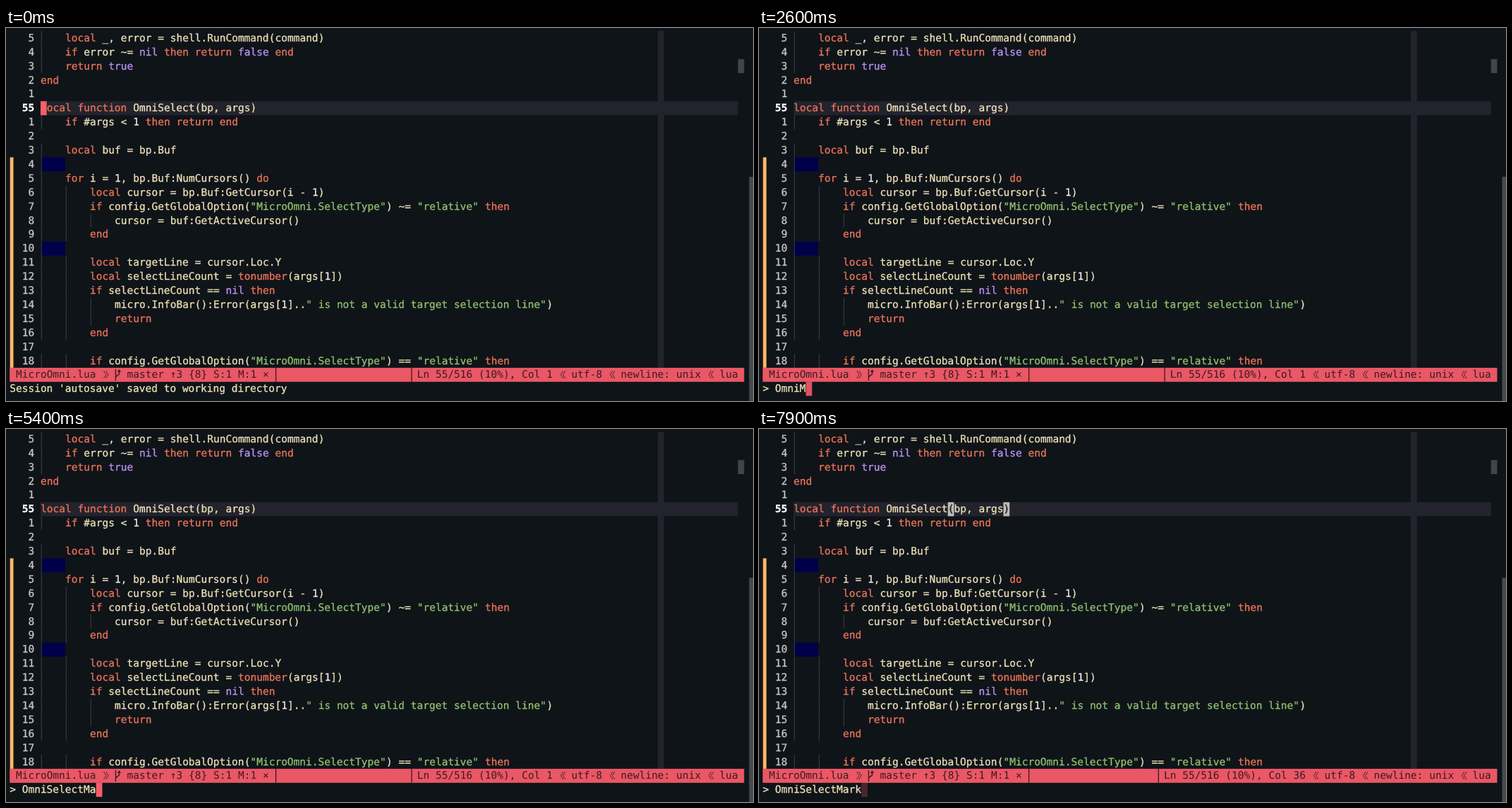
An HTML page that plays this animation: 1059 px wide and 529 px high, repeating every 8000 ms.

```html
<!DOCTYPE html>
<html lang="en">
<head>
<meta charset="utf-8">
<title>Terminal editor</title>
<style>
html, body { margin: 0; width: 100%; height: 100%; overflow: hidden; background: #0f1419; }
svg { display: block; width: 100vw; height: 100vh; }
text {
  font: 14.53px "DejaVu Sans Mono", monospace;
  text-rendering: geometricPrecision;
  white-space: pre;
}
</style>
</head>
<body>
<svg id="stage" viewBox="0 0 1059 529" xmlns="http://www.w3.org/2000/svg"></svg>
<script>
const CW = 8.75, RH = 19.9, LEFT = 5.2, TOP = 4.3, GUTTER = 5;
const LOOP = 8000, STEP = 100, BLINK = 800;
const C = {
  bg: '#0f1419', line: '#23232d', text: '#ede0b5', key: '#ec7358', lit: '#bb91ef',
  str: '#8fc06d', num: '#f4efe2', gutter: '#c5c8c6', guide: '#393c42', diff: '#feb766',
  trail: '#00004a', bar: '#ea5765', ink: '#3a1a22', cursor: '#fb5b6a', match: '#b9bab8', thumb: '#42444d'
};

const code = [
  '    local _, error = shell.RunCommand(command)',
  '    if error ~= nil then return false end',
  '    return true',
  'end',
  '',
  'local function OmniSelect(bp, args)',
  '    if #args < 1 then return end',
  '',
  '    local buf = bp.Buf',
  '    ',
  '    for i = 1, bp.Buf:NumCursors() do',
  '        local cursor = bp.Buf:GetCursor(i - 1)',
  '        if config.GetGlobalOption("MicroOmni.SelectType") ~= "relative" then',
  '            cursor = buf:GetActiveCursor()',
  '        end',
  '    ',
  '        local targetLine = cursor.Loc.Y',
  '        local selectLineCount = tonumber(args[1])',
  '        if selectLineCount == nil then',
  '            micro.InfoBar():Error(args[1].." is not a valid target selection line")',
  '            return',
  '        end',
  '',
  '        if config.GetGlobalOption("MicroOmni.SelectType") == "relative" then'
];
const CURRENT = 5, STATUS = 24, PROMPT = 25;

const colX = c => LEFT + c * CW;
const rowY = r => TOP + r * RH;
const esc = s => s.replace(/&/g, '&amp;').replace(/</g, '&lt;').replace(/>/g, '&gt;');
const rect = (x, y, w, h, fill, extra = '') =>
  `<rect x="${x}" y="${y}" width="${w}" height="${h}" fill="${fill}" ${extra}/>`;
const cells = (c, r, n, fill, extra) => rect(colX(c), rowY(r), n * CW, RH, fill, extra);
const label = (c, r, s, fill, extra = '') =>
  `<text x="${colX(c)}" y="${rowY(r) + 14.5}" fill="${fill}" ${extra}>${esc(s)}</text>`;
// Lettering on the dark background is slightly heavier than on the status bar.
const heavy = (c, r, s, fill, extra = '') =>
  label(c, r, s, fill, `stroke="${fill}" stroke-width="0.3" ${extra}`);

function colorOf(token) {
  if (token[0] === '"') return C.str;
  if (/^(local|function|if|then|return|end|for|do|tonumber)$/.test(token)) return C.key;
  if (/^(nil|true|false)$/.test(token)) return C.lit;
  return /^\d/.test(token) ? C.num : C.text;
}

function codeLine(s, r) {
  const parts = s.matchAll(/"[^"]*"|\w+|[^\w\s"]+/g);
  return [...parts].map(m => heavy(GUTTER + m.index, r, m[0], colorOf(m[0]))).join('');
}

function guides(s, r) {
  const indent = s.match(/^ */)[0].length;
  let out = '';
  for (let c = 0; c < indent; c += 4) out += rect(colX(GUTTER + c) + 0.8, rowY(r), 1.1, RH, C.guide);
  return out;
}

function trailing(r) {
  const x = colX(GUTTER) + 1.9;
  return rect(x, rowY(r), colX(GUTTER + 4) - x, RH, C.trail);
}

function chevron(c, dir) {
  const x = colX(c) + 5.7, y = rowY(STATUS) + 9.6;
  const stroke = k => `M${x - dir * 2 + k} ${y - 5.5}l${dir * 3.5} 5.5l${-dir * 3.5} 5.5`;
  return `<path d="${stroke(-1.7)}${stroke(1.5)}" fill="none" stroke="${C.ink}" stroke-width="0.9"/>`;
}

function branch(c) {
  const x = colX(c), y = rowY(STATUS);
  return `<path d="M${x + 1.5} ${y + 2}v16M${x + 1.5} ${y + 13}l5 -4v-5m-2 2l2 -2.5l2 2.5" fill="none" stroke="${C.ink}" stroke-width="1.4"/>`;
}

const divider = c => rect(colX(c) + 0.5, rowY(STATUS), 1.3, RH, C.ink);

function statusRight(col) {
  const s = `Ln 55/516 (10%), Col ${col}`, start = 88 - s.length;
  return divider(start - 1) + label(start, STATUS, s, C.ink);
}

function backdrop() {
  return rect(0, 0, 1059, 529, C.bg) +
    cells(GUTTER, CURRENT, 113, C.line) +
    rect(colX(105), TOP, CW, RH * STATUS, C.line) +
    cells(118, 2, 1, C.thumb) +
    rect(1053.5, 211, 5.5, 318, '#46494e') +
    rect(LEFT + 0.5, rowY(9), 4.8, RH * 15, C.diff) +
    code.map((s, r) => guides(s, r) + (s.trim() || !s ? '' : trailing(r))).join('') +
    cells(0, STATUS, 119, C.bar);
}

function lettering() {
  const numbers = code.map((s, r) => {
    const here = r === CURRENT, n = here ? '55' : String(Math.abs(r - CURRENT));
    return heavy(4 - n.length, r, n, here ? '#ffffff' : C.gutter, here ? 'style="font-weight:bold"' : '');
  });
  const bar = [[1, 'MicroOmni.lua'], [19, 'master'], [26, '↑3'], [29, '{8}'], [33, 'S:1'], [37, 'M:1'],
    [41, '×'], [91, 'utf-8'], [99, 'newline:'], [108, 'unix'], [115, 'lua']];
  return numbers.join('') + code.map(codeLine).join('') +
    bar.map(([c, s]) => label(c, STATUS, s, C.ink)).join('') +
    chevron(15, 1) + branch(17) + divider(43) + [89, 97, 113].map(c => chevron(c, -1)).join('');
}

const pair = [30, 39];
const stage = document.getElementById('stage');
stage.innerHTML = backdrop() +
  `<g id="match">${pair.map(c => cells(c, CURRENT, 1, C.match)).join('')}</g>` +
  cells(0, 0, 1, C.cursor, 'id="cursor"') +
  lettering() +
  `<g id="matchText">${heavy(pair[0], CURRENT, '(', C.bg)}${heavy(pair[1], CURRENT, ')', C.bg)}</g>` +
  `<g id="home">${statusRight(1)}</g><g id="lineEnd">${statusRight(36)}</g>` +
  heavy(0, PROMPT, '', C.text, 'id="prompt"');

const $ = id => document.getElementById(id);
const show = (id, on) => $(id).setAttribute('visibility', on ? 'visible' : 'hidden');

// Key presses: time and prompt content afterwards; null means the prompt is closed.
const OPEN = 580, END_KEY = 6110, WORD = 'OmniSelectMark';
const keys = [
  [0, null], [OPEN, ''], [1400, 'O'], [1500, 'Om'], [1690, 'Omn'], [1800, 'Omni'],
  [2500, 'OmniM'], [3400, 'OmniMa'], [3600, 'OmniMar'], [4000, 'OmniMa'],
  [4200, 'OmniM'], [4300, 'Omni'], [4500, 'OmniS'], [4700, 'OmniSe'],
  ...Array.from({ length: 8 }, (_, i) => [4900 + i * 100, WORD.slice(0, 7 + i)]),
  [5680, null], [END_KEY, null], [7000, ''], [7300, WORD]
];

function draw(t) {
  const [pressed, input] = keys.filter(k => k[0] <= t).pop();
  const atEnd = t >= END_KEY, open = input !== null;
  const fade = Math.abs(1 - ((t - pressed) % (2 * BLINK)) / BLINK);

  $('prompt').textContent = open ? '> ' + input
    : t < OPEN ? "Session 'autosave' saved to working directory" : '';
  $('cursor').setAttribute('x', colX(open ? 2 + input.length : GUTTER + (atEnd ? 35 : 0)));
  $('cursor').setAttribute('y', rowY(open ? PROMPT : CURRENT));
  $('cursor').setAttribute('opacity', fade);
  show('match', atEnd);
  show('matchText', atEnd);
  show('lineEnd', atEnd);
  show('home', !atEnd);
}

const begin = performance.now();
function tick() {
  const t = (performance.now() - begin) % LOOP;
  draw(Math.floor(t / STEP) * STEP);
  requestAnimationFrame(tick);
}
tick();
</script>
</body>
</html>
```
